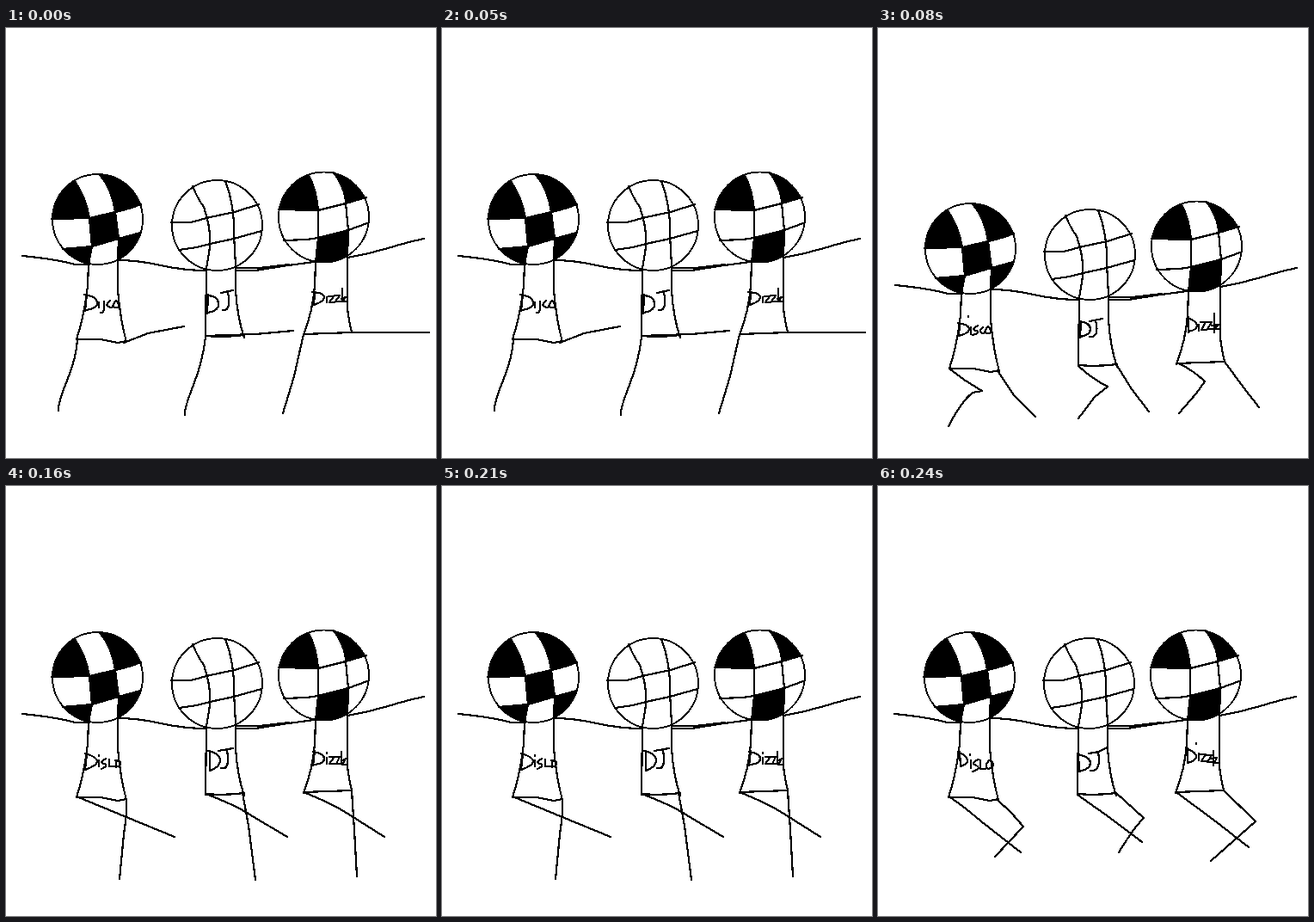
Write an HTML page that moves like this. It is 500 px wide and 500 px high and loops after 320 ms.

```html
<!DOCTYPE html>
<html lang="en">
<head>
<meta charset="utf-8">
<title>Dancing disco balls</title>
<style>
  html, body { margin: 0; width: 100%; height: 100%; overflow: hidden; background: #fff; }
  svg { display: block; width: 100%; height: 100%; }
  path, circle { fill: none; stroke: #000; stroke-width: 2.2; stroke-linejoin: round; shape-rendering: crispEdges; }
  path { stroke-linecap: round; }
  .tile { fill: #000; stroke: none; }
  .rim { stroke-width: 1.9; }
  .pose { visibility: hidden; }
</style>
</head>
<body>
<svg viewBox="0 0 500 500">
  <defs>
    <clipPath id="leftBall"><circle cx="106.5" cy="222.5" r="52.5"/></clipPath>
    <clipPath id="rightBall"><circle cx="369.5" cy="220" r="52.5"/></clipPath>
  </defs>

  <g id="bodies">
    <!-- left dancer -->
    <g clip-path="url(#leftBall)">
      <path class="tile" d="M50 165H75L80 178Q93 197 97 221L50 222Z
        M107 165L109 171Q123 187 127 214Q145 210 160 203V165Z
        M97 221L127 214L131 245L100 254Z
        M60 257L100 254L97 280H60Z M131 245L160 237V280H130Z"/>
    </g>
    <circle class="rim" cx="106.5" cy="222.5" r="52.5"/>
    <path d="M53 222L97 221L127 214Q145 210 157 205M66 257L100 254L131 245L156 238
      M80 178Q93 197 97 221L100 254L96 274L95 300Q91 335 82 362
      M109 171Q123 187 127 214L131 245L130 270V305Q133 340 140 365M82 362L110 362L130 366L140 364"/>

    <!-- middle dancer -->
    <circle class="rim" cx="245.5" cy="229.5" r="52.5"/>
    <path d="M192 226H215L237 220L266 214L294 205M201 258L222 255L237 251L265 245L297 236
      M217 184Q223 199 230 208Q239 234 237 255L233 280L232 359
      M255 178Q266 206 265 240L267 276V305Q269 337 277 360M232 358Q255 360 277 357"/>

    <!-- right dancer -->
    <g clip-path="url(#rightBall)">
      <path class="tile" d="M312 165H349L352 171Q361 188 363 212L312 211Z
        M380 165L381 168Q395 188 395 204L425 195V165Z
        M363 244L398 235L397 266L390 280H358Z"/>
    </g>
    <circle class="rim" cx="369.5" cy="220" r="52.5"/>
    <path d="M317 211L363 212L395 204L419 197M323 247L350 246L363 244L398 235L420 227
      M352 171Q361 188 363 212V244L360 273L359 300Q357 328 346 357
      M381 168Q395 188 395 204L398 235L397 267V325Q398 337 402 354M346 356L402 354"/>

    <!-- linked arms -->
    <path d="M19 265Q60 269 80 275H97M130 270Q153 270 180 276T233 282
      M267 279H295L329 275M267 282H290Q325 276 358 272
      M397 267Q421 263 444 256T486 245"/>
  </g>

  <!-- each pose: legs, then the three scribbled names -->
  <g class="pose">
    <path d="M83 362Q82 383 71 410T61 445M137 366L165 355L207 347
      M232 359Q229 387 218 415T208 450M232 358L290 356L334 352
      M346 356L335 405L322 448M402 354H492"/>
    <path d="M94 309L92 329M91 310Q105 312 106 319T93 328M108 319V325M114 318Q115 332 110 331
      M121 317Q113 324 123 325M128 317Q121 325 128 325T128 317"/>
    <path d="M235 310L234 332M233 311Q246 311 247 320T234 331M250 308L264 305M258 307Q262 330 252 328"/>
    <path d="M359 307L358 322M356 307Q370 308 370 313T358 322M373 313V319
      M375 312H381L376 319H382M382 311H388L383 318H389M391 303V318M390 315L395 313L391 318H396"/>
  </g>
  <g class="pose">
    <path d="M83 396L100 409L121 422L110 424Q97 434 82 463M140 400L158 427L183 452
      M233 393Q249 408 267 417L252 429L233 454M277 391L295 420L315 446
      M348 389Q368 399 380 411L370 425L350 448M403 388L425 418L443 441"/>
    <path d="M95 343L94 358M93 343Q106 345 106 350T94 358M105 335V336M108 348V356
      M116 346Q108 350 114 352T110 357M122 348Q115 354 123 355M128 347Q121 355 128 355T128 347"/>
    <path d="M236 341L235 360M234 341Q247 343 247 350T235 359M246 341L261 338M253 340Q258 360 246 359"/>
    <path d="M361 336V354M360 337Q371 341 371 346T361 353M373 345V352
      M375 342H381L376 351H382M383 342H388L383 350H389M391 332V354M388 346L396 345L391 350H396"/>
  </g>
  <g class="pose">
    <path d="M82 361L140 385L196 408M140 364Q141 380 137 405L132 457
      M232 358Q267 371 285 383L327 408M275 357L282 395L290 458
      M346 356Q379 369 399 382L440 408M402 354L405 400L408 454"/>
    <path d="M94 311L92 330M92 311Q106 315 106 320T92 330M108 313V314M108 319V326
      M116 317Q108 321 114 323T111 329M120 318V326H126M128 320V327Q136 324 132 320L127 319"/>
    <path d="M237 308V331M235 308Q249 311 249 319T237 331M247 308L264 305M257 307Q261 331 250 328"/>
    <path d="M359 308L357 325M357 309Q370 311 370 317T358 324M373 310V311M373 316V323
      M376 315H382L376 323H382M383 315H388L384 323H389M390 309V323M390 320L395 317L391 324H396"/>
  </g>
  <g class="pose">
    <path d="M82 361Q94 368 120 390L166 426M139 365L155 380L169 396L136 431
      M232 359L270 386L307 414M277 357L309 386Q297 398 280 426
      M348 357L390 388L431 420M402 354L439 390L387 436"/>
    <path d="M95 309L96 326M93 309Q104 314 104 319T96 326M107 312V313M108 319V328
      M117 318Q107 322 114 325T110 332M119 319V329H125M129 319Q123 326 128 329Q137 327 132 320Z"/>
    <path d="M233 312L234 332M232 312Q247 315 247 322T234 332M245 311L257 309L266 304M256 309Q260 333 247 331"/>
    <path d="M360 305V322M358 305Q371 310 370 315T360 322M370 299V300M373 311V319
      M375 312H381L376 320H382M382 313H388L383 321H389M390 308V325M387 317L394 316L391 322H395"/>
  </g>
</svg>
<script>
  const STEP = 80;
  const bodies = document.getElementById("bodies");
  const poses = document.querySelectorAll(".pose");

  function draw() {
    const current = Math.floor(performance.now() / STEP) % poses.length;
    poses.forEach((pose, i) => pose.style.visibility = i === current ? "visible" : "hidden");
    // the dancers crouch on the second beat
    bodies.setAttribute("transform", current === 1 ? "translate(1 34)" : "translate(0 0)");
    requestAnimationFrame(draw);
  }
  draw();
</script>
</body>
</html>
```
